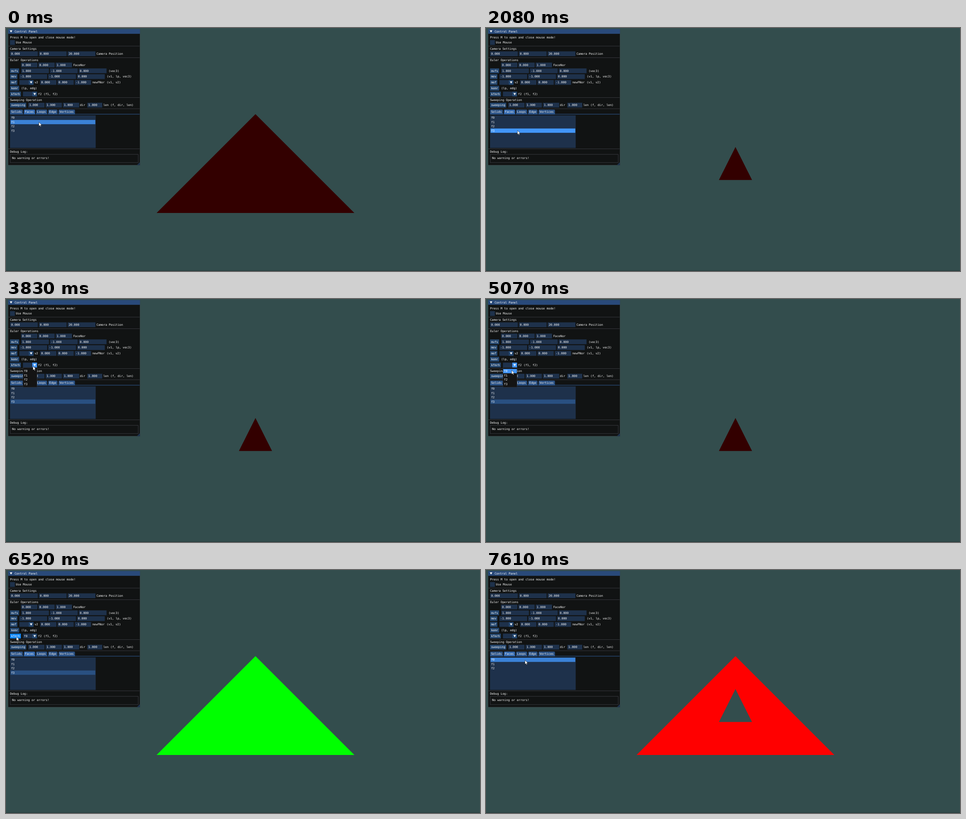
Recreate the animation shown at these times as an HTML page. Size 1045 by 536 pixels, loop 8000 ms.

```html
<!DOCTYPE html>
<html lang="en">
<head>
<meta charset="utf-8">
<title>Control Panel</title>
<style>
  html, body { margin: 0; width: 100%; height: 100%; overflow: hidden; background: #334d4d; }
  svg { display: block; width: 1045px; height: 536px; }
  text { font: 11.63px "DejaVu Sans Mono", monospace; fill: #fff; white-space: pre; text-rendering: geometricPrecision; }
</style>
</head>
<body>
<svg id="stage" viewBox="0 0 1045 536"></svg>
<script>
const LOOP = 8000, SCALE = 0.557;
const C = {
  window: '#111313', title: '#294a7a', frame: '#1e314b', frameHover: '#25476f',
  button: '#25476f', hot: '#4296fa', pressed: '#0f87fa', line: '#404149',
  tab: '#2a5082', tabActive: '#3368ad', tabHover: '#387ccc',
  rowSelected: '#295081', rowHover: '#3b82d7', popup: '#141414', grip: '#1d344e'
};

const stage = document.getElementById('stage');
function el(tag, attrs, parent) {
  const node = document.createElementNS('http://www.w3.org/2000/svg', tag);
  set(node, attrs);
  return parent.appendChild(node);
}
function set(node, attrs) {
  for (const key in attrs) node.setAttribute(key, attrs[key]);
}
const show = (node, on) => set(node, { visibility: on ? 'inherit' : 'hidden' });

// Scene behind the panel
el('rect', { width: 1045, height: 536, fill: '#334d4d' }, stage);
el('rect', { y: 534, width: 1045, height: 2, fill: '#2b4242' }, stage);
const BIG = 'M550 190L768 408H332Z', SMALL = 'M550 262.5L586.5 335.3H513.5Z';
const shape = el('path', { 'fill-rule': 'evenodd' }, stage);

// Panel, laid out in interface units
const panel = el('g', { transform: `scale(${SCALE})` }, stage);
let layer = panel;
const box = (x, y, w, h, fill, more) => el('rect', { x, y, width: w, height: h, fill, ...more }, layer);
const label = (x, y, string) => {
  const node = el('text', { x, y: y + 10.3 }, layer);
  node.textContent = string;
  return node;
};
const arrow = (x, y) => el('path', { d: `M${x - 5} ${y - 4}h10l-5 8.5z`, fill: '#fff' }, layer);
const divider = y => box(9, y, 520, 1.4, C.line);

function button(x, y, string) {
  const face = box(x, y, string.length * 7 + 8, 19, C.button);
  label(x + 4, y + 3, string);
  return face;
}
function fields(x, y, width, pitch, values) {
  values.forEach((value, i) => {
    box(x + i * pitch, y, width, 19, C.frame);
    label(x + i * pitch + 4, y + 3, value);
  });
}
function combo(x, y) {
  const frame = box(x, y, 37, 19, C.frame), knob = box(x + 37, y, 19, 19, C.button);
  arrow(x + 46.5, y + 9.5);
  return { frame, knob, value: label(x + 4, y + 3, '') };
}

box(8.5, 4, 522, 539.5, C.window, { stroke: '#4f5a5f', 'stroke-width': 0.8 });
box(8.5, 4, 522, 19, C.title);
arrow(20, 13.5);
label(34, 7, 'Control Panel');
label(16, 31, 'Press M to open and close mouse mode!');
box(16, 48, 19, 19, C.frame);
label(39, 51, 'Use Mouse');

divider(71);
label(16, 75, 'Camera Settings');
fields(16, 92.5, 110, 114, ['0.000', '0.000', '20.000']);
label(358, 95.5, 'Camera Position');

divider(117);
label(16, 120, 'Euler Operations');
fields(59.5, 137, 64.6, 68.6, ['0.000', '0.000', '1.000']);
label(266, 140, 'FaceNor');
button(16, 160, 'mvfs');
fields(60, 160, 110, 114, ['1.000', '-1.000', '0.000']);
label(406, 163, '(vec3)');
button(16, 183, 'mev');
fields(53, 183, 110, 114, ['-1.000', '-1.000', '0.000']);
label(399, 186, '(v1, lp, vec3)');
button(16, 206, 'mef');
combo(53, 206);
label(113, 209, 'v2');
fields(135, 206, 64.6, 68.6, ['0.000', '0.000', '-1.000']);
label(341.5, 209, 'newFNor');
label(398.5, 209, '(v1, v2)');
button(16, 229, 'kemr');
label(60, 232, '(lp, edg)');
const merge = button(16, 252, 'kfmrh');
const picker = combo(67, 252);
label(127, 255, 'f2');
label(149, 255, '(f1, f2)');

divider(275);
label(16, 279, 'Sweeping Operation');
button(16, 296, 'sweeping');
fields(88, 296, 64.6, 68.6, ['1.000', '1.000', '1.000']);
label(292.5, 299, 'dir');
fields(322, 296, 59, 0, ['1.000']);
label(385, 299, 'len');
label(413.5, 299, '(f, dir, len)');

divider(319);
let tabX = 16;
const tabs = ['Solids', 'Faces', 'Loops', 'Edge', 'Vertices'].map((name, i) => {
  const x = tabX, w = name.length * 7 + 9;
  const face = el('path', { d: `M${x} 342v-15q0-4 4-4h${w - 8}q4 0 4 4v15z` }, layer);
  label(x + 4, 326, name);
  tabX += w + 4;
  return { face, x, w, base: i === 1 ? C.tabActive : C.tab };
});
box(16, 340.5, 513, 1.5, C.tabActive);

box(16, 346, 339, 129, C.frame);
const rows = [0, 1, 2, 3].map(i => {
  const y = 347 + i * 17;
  return { y, bar: box(18, y, 335.5, 17, C.frame), name: label(20, y + 2, 'f' + i) };
});

divider(478);
label(16, 483, 'Debug Log:');
box(16.5, 500.5, 507, 32.5, 'none', { stroke: C.line, 'stroke-width': 1.4 });
label(24, 508, 'No warning or errors!');
el('path', { d: 'M530 531v12h-12z', fill: C.grip }, layer);

const popup = layer = el('g', {}, panel);
box(67.5, 271.5, 55, 78, C.popup, { stroke: C.line, 'stroke-width': 0.8 });
const option = box(68, 277, 54, 17, C.popup);
for (let i = 0; i < 4; i++) label(71, 279 + i * 17, 'f' + i);

const cursor = el('path', {
  d: 'M0 0V9L2.1 7.2L3.5 10.3L4.9 9.7L3.5 6.7H6.3Z',
  fill: '#fff', stroke: '#000', 'stroke-width': 0.5
}, stage);

// Pointer paths as [time, x, y]; the pointer steps every 60 ms and rests in between
const STEP = 60;
const paths = [
  [[0, 72.5, 207.5]],
  [[120, 72, 213], [180, 71.5, 215.5]],
  [[790, 71, 219], [910, 69.3, 226]],
  [[2750, 69, 222], [2990, 67, 199], [3230, 63, 165], [3400, 59.5, 148]],
  [[4140, 59, 150], [4320, 56.5, 157]],
  [[5500, 59, 156], [5680, 74, 151], [5860, 92, 147], [5920, 92, 146], [6040, 70, 146], [6210, 23, 147]],
  [[6830, 36, 152], [6890, 76, 173], [6950, 113, 197], [7010, 128.5, 204.5], [7070, 127, 209], [7310, 86, 199]]
];
const presses = [[490, 610], [1090, 1210], [2080, 2200], [2380, 2500], [5070, 5190], [6520, 6640], [7490, 7610]];

function along(path, t) {
  const i = path.findIndex(p => p[0] >= t);
  if (i < 1) return path[i < 0 ? path.length - 1 : 0].slice(1);
  const [t0, x0, y0] = path[i - 1], [t1, x1, y1] = path[i];
  const k = (t - t0) / (t1 - t0);
  return [x0 + (x1 - x0) * k, y0 + (y1 - y0) * k];
}

// Highlights trail a moving pointer by one step
function pointer(t) {
  const path = paths.filter(p => p[0][0] <= t).pop();
  const start = path[0][0], end = path[path.length - 1][0];
  if (t >= end) return { tip: along(path, end), hot: along(path, end) };
  const tick = start + Math.floor((t - start) / STEP) * STEP;
  return { tip: along(path, tick), hot: along(path, tick - STEP) };
}

function sceneAt(t) {
  if (t < 610) return { selected: 1, d: BIG, fill: '#330000' };
  if (t < 1210) return { selected: 2, d: SMALL, fill: '#ff0000' };
  if (t < 5190) return { selected: 3, d: SMALL, fill: '#330000' };
  if (t < 6640) return { selected: 3, d: BIG, fill: '#00ff00' };
  if (t < 7610) return { selected: -1, d: '', fill: 'none' };
  return { selected: 0, d: BIG + SMALL, fill: '#ff0000' };
}

function draw(t) {
  const { tip, hot } = pointer(t);
  const [hx, hy] = hot.map(v => v / SCALE);
  const open = t >= 3830 && t < 5190;
  const held = presses.some(([a, b]) => t >= a && t < b);
  const inside = (x, y, w, h) => hx >= x && hx < x + w && hy >= y && hy < y + h;
  const over = (...area) => !open && inside(...area);
  const { selected, d, fill } = sceneAt(t);

  set(shape, { d, fill });
  set(cursor, { transform: `translate(${tip[0]} ${tip[1]})` });

  rows.forEach(({ y, bar, name }, i) => {
    const exists = i < 3 || t < 6640;
    const hovered = exists && over(18, y, 335, 17);
    const color = hovered ? (held ? C.hot : C.rowHover) : C.rowSelected;
    set(bar, { fill: color });
    show(bar, hovered || i === selected);
    show(name, exists);
  });

  tabs.forEach(({ face, x, w, base }) => set(face, { fill: over(x, 323, w, 19) ? C.tabHover : base }));
  set(merge, { fill: over(16, 252, 43, 19) ? (held ? C.pressed : C.hot) : C.button });

  const onPicker = over(67, 252, 56, 19);
  set(picker.frame, { fill: onPicker ? C.frameHover : C.frame });
  set(picker.knob, { fill: onPicker || open ? C.hot : C.button });
  picker.value.textContent = t >= 5190 && t < 6640 ? 'f0' : '';

  show(popup, open);
  set(option, { fill: inside(68, 277, 54, 17) ? (held ? C.hot : C.rowHover) : C.popup });
}

const begin = performance.now();
function tick() {
  draw((performance.now() - begin) % LOOP);
  requestAnimationFrame(tick);
}
tick();
</script>
</body>
</html>
```
